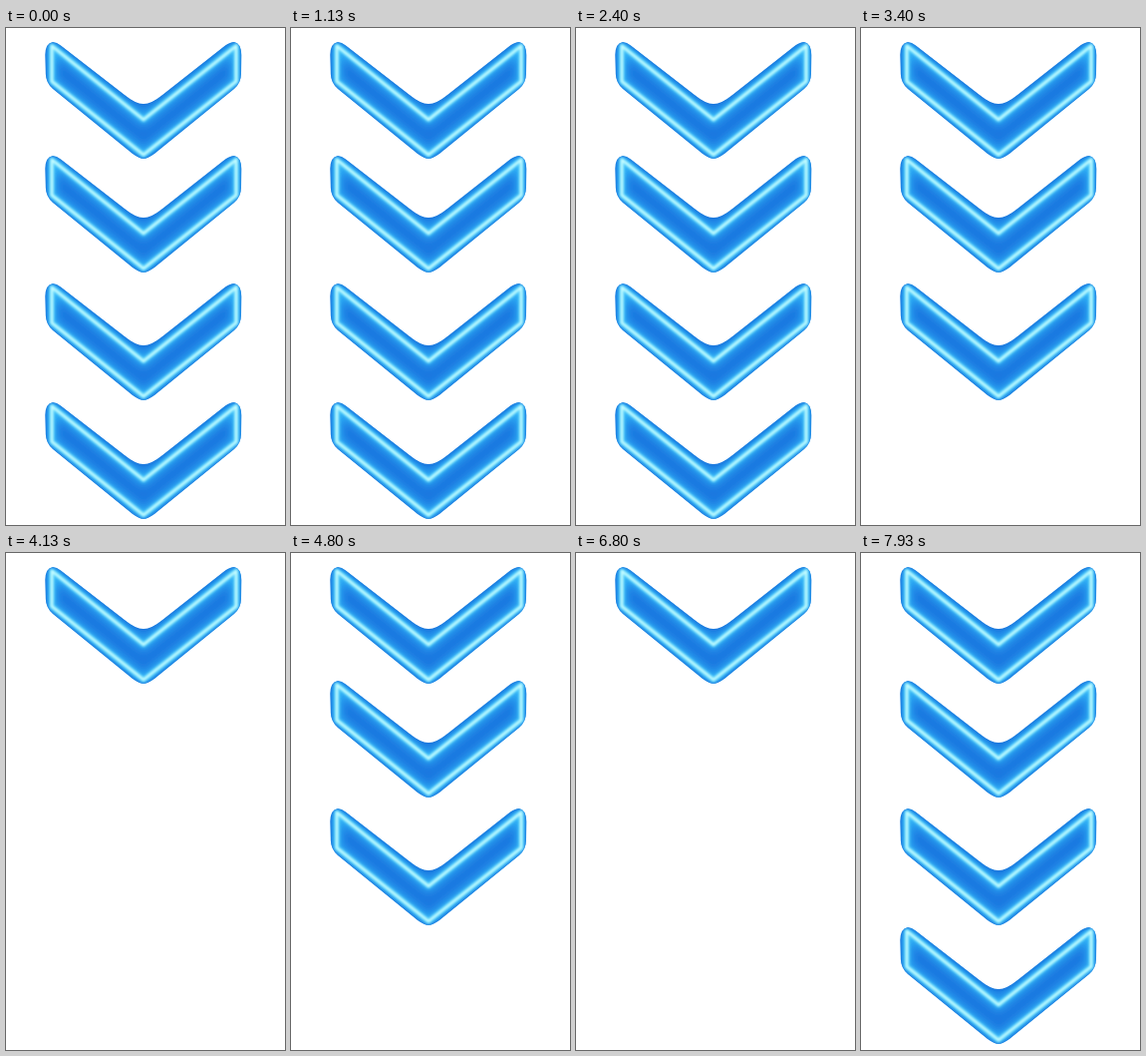
An HTML page that plays this animation: 280x498 px, repeating every 8 s.

```html
<!DOCTYPE html>
<html lang="en">
<head>
<meta charset="utf-8">
<title>Neon chevrons</title>
<style>
  html, body { margin: 0; width: 100%; height: 100%; overflow: hidden; background: #fff; }
  svg { display: block; width: 100%; height: 100%; }
</style>
</head>
<body>
<svg viewBox="0 0 280 498">
  <defs>
    <path id="edge" d="M47 14 Q51 14 55 17.5 L119 67 Q130 76 138 76 Q146 76 157 67 L220 17.5 Q225 14 229 14
      Q236 15 236.3 27 L236 46 Q236 55 229 61 L149 126 Q142 131 138 131 Q134 131 127 126 L47 61
      Q40 55 39.8 46 L39.3 27 Q39.5 15 47 14 Z"/>
    <path id="tube" d="M46 18 L138 91.8 L231 18 V53.5 L138 127 L46 53.5 Z"/>
    <clipPath id="clip"><use href="#edge"/></clipPath>
    <filter id="wide" x="-20%" y="-20%" width="140%" height="140%"><feGaussianBlur stdDeviation="4"/></filter>
    <filter id="near" x="-20%" y="-20%" width="140%" height="140%"><feGaussianBlur stdDeviation="1.6"/></filter>
    <filter id="soft" x="-20%" y="-20%" width="140%" height="140%"><feGaussianBlur stdDeviation="0.8"/></filter>
    <g id="chevron" clip-path="url(#clip)" fill="none" stroke-linejoin="round">
      <use href="#edge" fill="#1b78e0"/>
      <use href="#tube" stroke="#2fb0f6" stroke-width="10" filter="url(#wide)"/>
      <use href="#edge" stroke="#1a74da" stroke-width="2.4" stroke-opacity=".7" filter="url(#soft)"/>
      <use href="#tube" stroke="#58d2fb" stroke-width="5" filter="url(#near)"/>
      <use href="#tube" stroke="#c4fcff" stroke-width="2.6" filter="url(#soft)"/>
    </g>
  </defs>
  <use class="arrow" href="#chevron"/>
  <use class="arrow" href="#chevron" y="114"/>
  <use class="arrow" href="#chevron" y="242"/>
  <use class="arrow" href="#chevron" y="361"/>
</svg>
<script>
  const LOOP = 8000, CYCLE = 13;
  const arrows = document.querySelectorAll('.arrow');
  const start = performance.now();

  // Steps alternate between 130 ms and 70 ms.
  const stepAt = t => 2 * Math.floor(t / 200) + (t % 200 >= 130 ? 1 : 0);

  // One more arrow every three steps; the full column holds for four.
  const countAt = step => Math.min(4, 1 + Math.floor((step + 11) % CYCLE / 3));

  function draw(now) {
    const count = countAt(stepAt(Math.max(0, now - start) % LOOP));
    arrows.forEach((arrow, i) => {
      arrow.style.visibility = i < count ? 'visible' : 'hidden';
    });
    requestAnimationFrame(draw);
  }
  draw(start);
</script>
</body>
</html>
```
